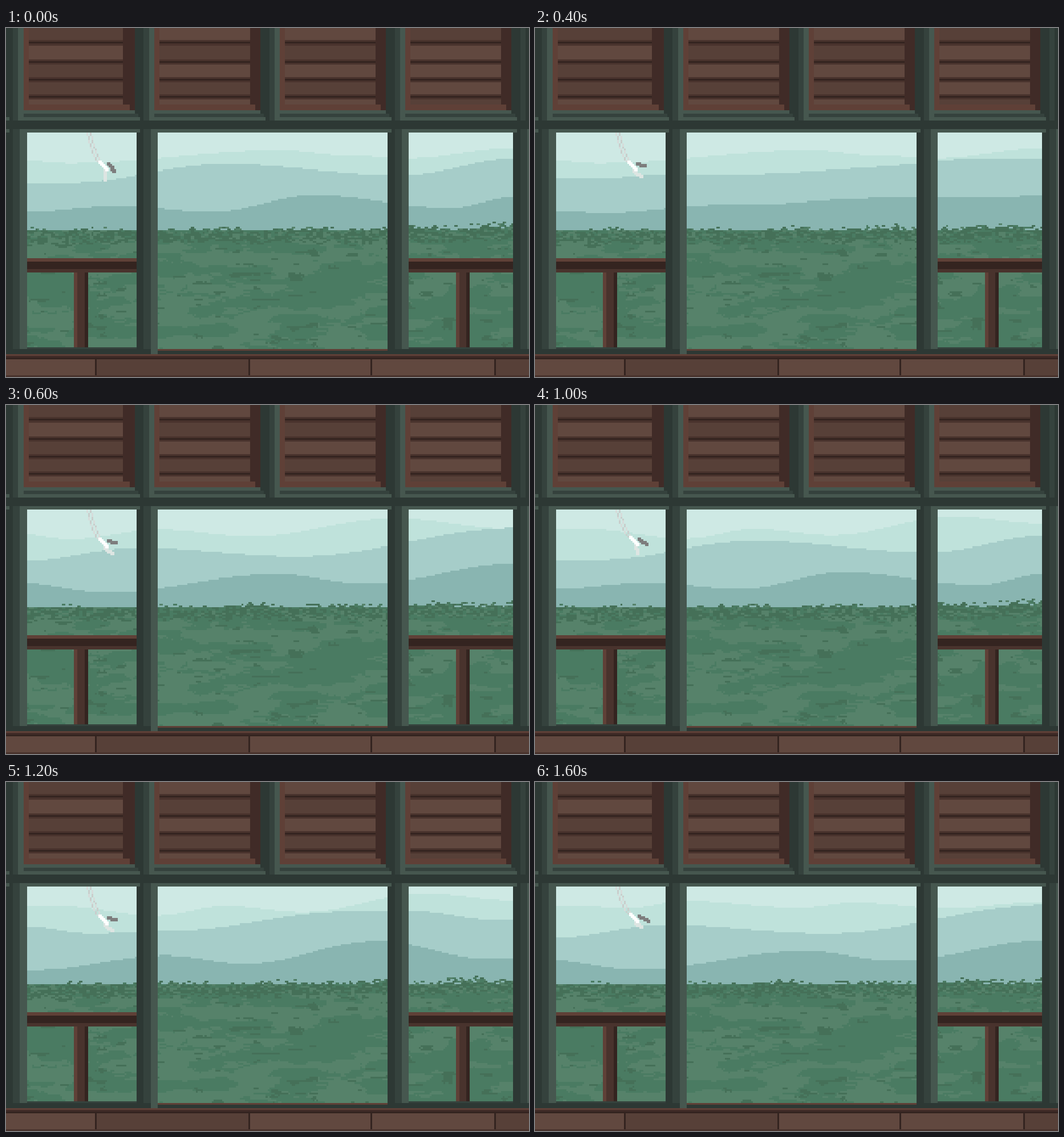
Write an HTML page with a canvas that moves like this. It is 917x611 px and loops after 1.8 s.

```html
<!DOCTYPE html>
<html lang="en">
<head>
<meta charset="utf-8">
<title>Window view</title>
<style>
html, body { margin: 0; width: 100%; height: 100%; overflow: hidden; background: #2d3834; }
canvas { display: block; width: 917px; height: 611px; image-rendering: pixelated; }
</style>
</head>
<body>
<canvas id="view" width="300" height="200"></canvas>
<script>
const view = document.getElementById('view').getContext('2d');
let ctx = view;
const CELL = 917 / 300;
const LEFT = 12, RIGHT = 291;
const DARK = '#2d3834', MID = '#35423d', LIGHT = '#46574f';
const WOOD = { red: '#5f4037', a: '#574038', b: '#61483f', shade: '#402b27', edge: '#49332d', line: '#342420' };
const GRASS = { light: '#56826a', mid: '#4a7b62', dark: '#457058' };
const AIR = ['#cee9e4', '#bfe2db', '#a6cdc9', '#89b5b1'];

// Crests and troughs of each ridge in stage pixels, joined by eased slopes
const sky = [
  [[30, 232], [110, 237], [480, 214], [600, 223], [706, 228], [890, 210]],
  [[30, 226], [110, 235], [270, 218], [430, 230], [680, 198], [890, 217]],
  [[90, 217], [265, 234], [385, 217], [520, 228], [735, 195], [890, 207]],
  [[60, 217], [170, 220], [260, 208], [465, 220], [560, 211], [720, 221], [890, 210]]
];
const far = [
  [[40, 273], [110, 271], [385, 238], [690, 258], [900, 228]],
  [[37, 253], [150, 265], [290, 260], [600, 227], [725, 227], [850, 241]],
  [[30, 273], [230, 250], [510, 265], [900, 215]]
];
const near = [
  [[30, 322], [200, 311], [360, 322], [540, 293], [780, 315], [890, 296]],
  [[50, 329], [280, 304], [420, 318], [650, 279], [850, 310]],
  [[30, 312], [175, 328], [475, 296], [630, 313], [900, 277]]
];
const windPhase = [0, 1, 1.5, 2, 2.5];

// Bird poses: head position, then wing tip and tail tip relative to it
const poses = {
  a: [53, 76, 8, 5, 3, 10],
  b: [54, 75, 9, 4, 4, 9],
  c: [53, 76, 9, 2, 7, 8],
  d: [54, 75, 10, 4, 6, 7]
};
const birdSteps = 'abccabccd';

function rect(color, x0, y0, x1, y1) {
  ctx.fillStyle = color;
  ctx.fillRect(x0, y0, x1 - x0, y1 - y0);
}

function layer(paint) {
  const canvas = document.createElement('canvas');
  canvas.width = 300;
  canvas.height = 200;
  ctx = canvas.getContext('2d');
  paint();
  ctx = view;
  return canvas;
}

function hash(x, y, seed = 0) {
  let h = Math.imul(x, 374761393) + Math.imul(y, 668265263) + Math.imul(seed, 974634777);
  h = Math.imul(h ^ (h >>> 13), 1274126177);
  return ((h ^ (h >>> 16)) >>> 0) / 4294967296;
}

const ease = t => (1 - Math.cos(Math.PI * t)) / 2;
const lerp = (a, b, t) => a + (b - a) * t;

function noise(x, y, seed) {
  const i = Math.floor(x), j = Math.floor(y), t = ease(x - i), u = ease(y - j);
  const row = k => lerp(hash(i, k, seed), hash(i + 1, k, seed), t);
  return lerp(row(j), row(j + 1), u);
}

function heightAt(points, x) {
  const k = points.findIndex(p => p[0] > x);
  if (k === 0) return points[0][1];
  if (k < 0) return points[points.length - 1][1];
  const [x0, y0] = points[k - 1], [x1, y1] = points[k];
  return lerp(y0, y1, ease((x - x0) / (x1 - x0)));
}

// A fractional phase lies between two neighbouring shapes
function drawRidge(shapes, phase, color) {
  const i = Math.floor(phase), next = (i + 1) % shapes.length;
  for (let x = LEFT; x < RIGHT; x++) {
    const px = (x + 0.5) * CELL;
    const y = lerp(heightAt(shapes[i], px), heightAt(shapes[next], px), phase - i);
    rect(color, x, Math.round(y / CELL), x + 1, 118);
  }
}

function drawGrass() {
  const bump = (x, y, cx, cy) => Math.exp(-(((x - cx) / 24) ** 2) - ((y - cy) / 9) ** 2);
  for (let y = 116; y < 185; y++) {
    for (let x = LEFT; x < RIGHT; x++) {
      const field = 0.6 * noise(x / 24, y / 6, 1) + 0.3 * noise(x / 8, y / 2.5, 2) + 0.1 * hash(x >> 2, y, 3)
        + 0.3 * bump(x, y, 205, 140) - 0.2 * bump(x, y, 110, 178) - 0.15 * bump(x, y, 160, 148);
      const crease = noise(x / 11, y / 1.8, 4) + 0.1 * hash(x >> 1, y, 5);
      const color = crease > 0.9 ? GRASS.dark : field > 0.5 ? GRASS.mid : GRASS.light;
      rect(color, x, y, x + 1, y + 1);
    }
  }
}

function drawTrees(phase) {
  const seed = phase * 2;
  for (let x = LEFT; x < RIGHT; x++) {
    const px = x * CELL;
    const top = 357 - 10 * (px / 917) ** 2 + 2.5 * Math.cos((px - 98) / 27 + phase * 1.7);
    const edge = Math.round(top / CELL);
    for (let y = edge - 2; y < 124; y++) {
      const depth = y - edge;
      if (hash((x + y) >> 1, y, seed + 10) > (depth + 2.6) / 4.2) continue;
      const n = hash(x >> 1, y, seed + 20);
      const dark = 0.6 - Math.max(0, depth - 4) * 0.12;
      if (y > 120 && n > dark) continue;
      rect(n < dark ? GRASS.dark : n < 0.8 ? GRASS.mid : GRASS.light, x, y, x + 1, y + 1);
    }
  }
}

function drawLimb(x0, y0, x1, y1, color) {
  const n = Math.max(Math.abs(x1 - x0), Math.abs(y1 - y0));
  for (let i = 0; i <= n; i++) {
    const x = Math.round(lerp(x0, x1, i / n)), y = Math.round(lerp(y0, y1, i / n));
    rect(color, x, y, x + 2, y + 2);
  }
}

function drawBird(pose) {
  const [x, y, wingX, wingY, tailX, tailY] = poses[pose];
  for (let row = 60; row <= y; row++) {
    const t = (row - 60) / (y - 60);
    const left = Math.round(lerp(46, x - 1, 0.7 * t + 0.3 * t ** 4));
    const odd = (row >> 1) % 2;
    rect(odd ? '#c9cecc' : '#d6dcda', left, row, left + 1, row + 1);
    rect(odd ? '#d6dcda' : '#c9cecc', left + 2, row, left + 3, row + 1);
  }
  drawLimb(x + 3, y + 5, x + tailX, y + tailY, '#dde5e2');
  drawLimb(x + 5, y + 1, x + wingX, y + wingY, '#7d7d7d');
  drawLimb(x, y, x + 4, y + 4, '#ffffff');
}

function drawRails() {
  for (const [left, right, post] of [[12, 75, 39], [231, 291, 258]]) {
    rect(WOOD.red, left, 132, right, 134);
    rect(WOOD.line, left, 134, right, 138);
    rect(WOOD.edge, left, 138, right, 140);
    rect(WOOD.red, post, 140, post + 2, 184);
    rect(WOOD.edge, post + 2, 140, post + 6, 184);
    rect(WOOD.line, post + 6, 140, post + 8, 184);
  }
}

function drawPanel(x, slatEnd, end, tones) {
  rect(MID, x - 6, 0, x - 3, 53);
  rect(LIGHT, x - 3, 0, end, 49);
  rect(MID, x, 49, end + 2, 51);
  rect(LIGHT, x - 3, 51, end + 3, 53);
  rect(LIGHT, x - 3, 0, x, 51);
  rect(DARK, end, 0, end + 4, 49);
  rect(WOOD.red, x, 0, end, 47);
  rect(WOOD.shade, slatEnd, 0, end, 44);
  rect(WOOD.shade, end - 3, 44, end, 47);
  const seams = [-1, 8, 19, 29, 39, 44];
  [...tones].forEach((tone, i) => {
    rect(WOOD[tone], x + 3, seams[i] + 1, slatEnd, seams[i + 1]);
  });
  for (const y of seams.slice(1, 5)) {
    rect(WOOD.edge, x + 3, y - 1, slatEnd, y + 2);
    rect(WOOD.line, x + 3, y, slatEnd, y + 1);
  }
}

function drawRoom() {
  drawRails();
  rect(DARK, 0, 0, 300, 60);
  drawPanel(10, 67, 74, 'abaab');
  drawPanel(85, 140, 146, 'babab');
  drawPanel(157, 212, 218, 'babab');
  drawPanel(229, 284, 290, 'abbba');
  rect(MID, 295, 0, 298, 53);
  rect(LIGHT, 0, 51, 2, 53);

  rect(MID, 12, 183, 75, 184);
  rect(MID, 231, 183, 291, 184);
  rect(DARK, 0, 184, 300, 187);
  rect(WOOD.red, 87, 184, 219, 185);
  rect(LIGHT, 0, 58, 2, 60);
  for (const x of [0, 75, 219, 291]) {
    rect(DARK, x, 60, x + 4, 187);
    rect(MID, x + 4, 58, x + 8, 184);
    rect(LIGHT, x + 8, 58, x + 12, x === 75 ? 187 : 184);
  }
  for (const [left, right] of [[12, 75], [87, 219], [231, 291]]) {
    rect(LIGHT, left, 58, right + 2, 60);
  }

  rect(WOOD.red, 0, 187, 300, 188);
  rect(WOOD.shade, 0, 188, 300, 190);
  const joints = [0, 51, 139, 209, 280, 300];
  [...'babba'].forEach((tone, i) => {
    rect(WOOD[tone], joints[i], 190, joints[i + 1], 199);
    if (i) rect(WOOD.line, joints[i], 190, joints[i] + 1, 200);
  });
  rect(WOOD.line, 0, 189, 300, 190);
  rect(WOOD.edge, 0, 199, 300, 200);
}

const ground = layer(drawGrass), room = layer(drawRoom);

function draw(step) {
  const phase = windPhase[step % 5];
  rect(AIR[0], LEFT, 60, RIGHT, 118);
  drawRidge(sky, Math.floor(step * 0.45), AIR[1]);
  drawRidge(far, phase, AIR[2]);
  drawRidge(near, phase, AIR[3]);
  ctx.drawImage(ground, 0, 0);
  drawTrees(phase);
  drawBird(birdSteps[step]);
  ctx.drawImage(room, 0, 0);
}

let shown = -1;
function tick() {
  const step = Math.floor(performance.now() % 1800 / 200);
  if (step !== shown) draw(shown = step);
  requestAnimationFrame(tick);
}
tick();
</script>
</body>
</html>
```
